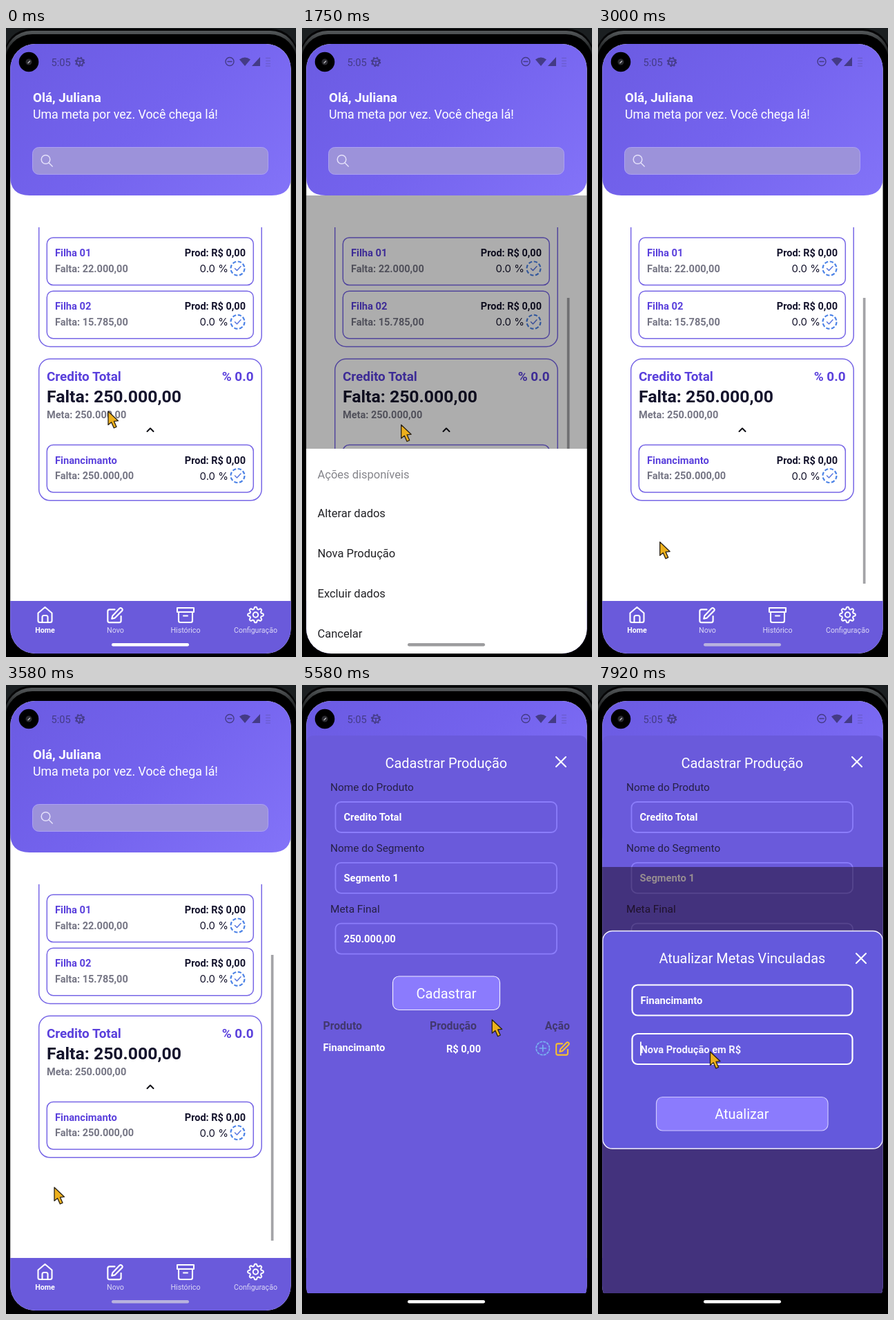
These frames come from a looping animation (420x909 px, 8000 ms). An HTML page:

```html
<!DOCTYPE html>
<html lang="pt">
<head>
<meta charset="utf-8">
<style>
html, body { margin: 0; width: 100%; height: 100%; overflow: hidden; background: #000; }
svg { display: block; width: 100vw; height: 100vh; font-family: Roboto, sans-serif; }
.b { font-weight: 700; }
.line { fill: none; stroke-linecap: round; stroke-linejoin: round; }
</style>
</head>
<body>
<svg id="stage" viewBox="0 0 420 909"></svg>
<script>
const LOOP = 8000;
const PURPLE = '#6a5adb', BORDER = '#7766e6', TITLE = '#5a40dc', INK = '#14132c', GRAY = '#757584';

const text = (x, y, size, fill, str, opts = '') =>
  `<text x="${x}" y="${y}" font-size="${size}" fill="${fill}" ${opts}>${str}</text>`;
const bold = (x, y, size, fill, str, opts = '') => text(x, y, size, fill, str, `class="b" ${opts}`);
const END = 'text-anchor="end"', MID = 'text-anchor="middle"';
const box = (x, y, w, h, r, fill, stroke = 'none', sw = 1.5) =>
  `<rect x="${x}" y="${y}" width="${w}" height="${h}" rx="${r}" fill="${fill}" stroke="${stroke}" stroke-width="${sw}"/>`;
const line = (d, stroke, sw, extra = '') =>
  `<path class="line" d="${d}" stroke="${stroke}" stroke-width="${sw}" ${extra}/>`;
const ring = (x, y, r, stroke, sw, extra = '') =>
  `<circle cx="${x}" cy="${y}" r="${r}" fill="none" stroke="${stroke}" stroke-width="${sw}" ${extra}/>`;

function gear(cx, cy, r, amp) {
  let d = '';
  for (let i = 0; i < 96; i++) {
    const a = i / 96 * Math.PI * 2;
    const q = r + amp * Math.tanh(2 * Math.cos(8 * a));
    d += (i ? 'L' : 'M') + (cx + q * Math.cos(a)).toFixed(2) + ' ' + (cy + q * Math.sin(a)).toFixed(2);
  }
  return d + 'Z';
}

const edit = (x, y, s, color, sw) => `<g transform="translate(${x} ${y}) scale(${s})">` +
  line('M0-8H-7Q-9.5-8-9.5-5.5V7Q-9.5 9.5-7 9.5H6Q8.5 9.5 8.5 7V1M6.5-9.5Q8-11 9.7-9.4Q11.3-7.7 9.7-6.2L0 3.4L-4 4.4L-3 .4Z', color, sw) + '</g>';
const close = (x, y) => line(`M${x - 7} ${y - 7}l14 14m0-14l-14 14`, '#fff', 2.1);

function goal(y, name, left) {
  return box(59.3, y, 299, 68.5, 9, '#fff', BORDER) +
    bold(71, y + 27, 14.7, TITLE, name) +
    bold(71, y + 49.5, 14.5, GRAY, 'Falta: ' + left) +
    bold(347, y + 27, 14.5, INK, 'Prod: R$ 0,00', END) +
    text(322, y + 50, 15, INK, '0.0 %', END + ' font-family="Inter, sans-serif"') +
    ring(335.5, y + 44.5, 10, '#4b82e6', 2.2, 'stroke-dasharray="5.2 2.65"') +
    line(`M331.5 ${y + 44.5}l3 3l5.5-6`, '#5b78e0', 1.5);
}

function field(y, label, value) {
  return text(41, y - 16, 15.4, '#262046', label) +
    box(48.5, y, 320.5, 44, 8, 'none', '#8b7dfb', 1.8) +
    bold(60.5, y + 27, 14.7, '#fff', value);
}

const statusBar = () => {
  const c = '#443b86';
  return `<circle cx="33" cy="49" r="14.3" fill="#000"/><circle cx="33" cy="49" r="4.5" fill="#2b2b30"/>` +
    line('M32 50.5l2.5-2.5', '#b9b9bd', 1.4) +
    text(65.5, 55, 14.6, c, '5:05') +
    ring(107, 49, 5, c, 1.7) + ring(107, 49, 6.5, c, 1.5, 'stroke-dasharray="2.5 2.6"') +
    line('M102 48h10M107 48v6', c, 1.6) +
    ring(324, 48.5, 6, c, 1.4) + line('M321 48.5h6', c, 1.4) +
    `<path d="M338 45.5Q346 39.5 354 45.5L346 55Z" fill="${c}"/><path d="M368 42V55H356Z" fill="${c}"/>` +
    line('M376.5 43.5h6M376.5 47.5h6M376.5 51.5h6M376.5 55h6', '#6357b8', 1.3, 'opacity=".55"');
};

const header = () =>
  `<path d="M6 23H413V214Q413 242 385 242H34Q6 242 6 214Z" fill="url(#sky)"/>` +
  bold(39, 106.5, 18.8, '#fff', 'Olá, Juliana') +
  text(39, 130.5, 17.8, '#fff', 'Uma meta por vez. Você chega lá!') +
  box(38.5, 172.5, 341, 39, 9, '#9c92da', '#aca1f2', 1) +
  ring(57.5, 190, 6.3, '#e4e0fa', 1.5) + line('M62.2 195l5 5', '#e4e0fa', 1.5);

const tabs = () => {
  const w = '#fff', off = '#dcd8f6';
  return `<rect x="6" y="828" width="407" height="80" fill="${PURPLE}"/>` +
    line('M46.5 845.5L56.5 837L66.5 845.5V856.5Q66.5 859 64 859H49Q46.5 859 46.5 856.5ZM52.5 859V851.5Q52.5 849 55 849H58Q60.5 849 60.5 851.5V859', w, 2.1) +
    edit(157.5, 849, 1.07, w, 2) +
    line('M248 838h24v6h-24ZM250 844V856.5Q250 859 252.5 859H267.5Q270 859 270 856.5V844M257 849.5h6', w, 2.1) +
    line(gear(361.5, 848, 9.9, 1.5), w, 2) + ring(361.5, 848, 3.7, w, 2) +
    bold(56.5, 874, 10.7, w, 'Home', MID) +
    text(158.5, 874, 10.7, off, 'Novo', MID) +
    text(260, 874, 10.7, off, 'Histórico', MID) +
    text(361.5, 874, 10.6, off, 'Configuração', MID);
};

const home = () => `<rect x="6" y="23" width="407" height="886" fill="#fff"/>
  <g clip-path="url(#list)">${box(47.7, 220, 322.5, 240.5, 16, '#fff', BORDER)}
    ${goal(303, 'Filha 01', '22.000,00')}${goal(380.2, 'Filha 02', '15.785,00')}</g>
  <g id="card">${box(47.7, 478.3, 322.5, 204.5, 16, '#fff', BORDER)}
    ${bold(59, 509.5, 18.9, TITLE, 'Credito Total')}${bold(358.5, 509.5, 18.9, TITLE, '% 0.0', END)}
    ${bold(59, 541, 24.8, INK, 'Falta: 250.000,00')}${bold(59, 563.5, 14.5, GRAY, 'Meta: 250.000,00')}
    ${goal(602.5, 'Financimanto', '250.000,00')}</g>
  ${line('M204.5 583l4.5-4.5l4.5 4.5', '#0c0c14', 2, 'id="chevron"')}
  <rect id="bar" x="383.8" y="390" width="3.7" height="413" fill="#a3a3a7"/>
  ${tabs()}<rect id="dim" x="6" y="242" width="407" height="667"/>${header()}`;

const sheet = () => `<g id="sheet"><rect x="6" y="608" width="407" height="301" fill="#fff"/>
  ${text(22.5, 650.5, 16.5, '#85858b', 'Ações disponíveis')}
  ${['Alterar dados', 'Nova Produção', 'Excluir dados', 'Cancelar']
    .map((s, i) => text(22.5, 707 + 58 * i, 16.5, '#222226', s)).join('')}</g>`;

const form = () => `<g id="form"><path d="M6 909V85Q6 73 18 73H401Q413 73 413 85V909Z" fill="${PURPLE}"/>
  ${text(208.8, 119.5, 19.9, '#fff', 'Cadastrar Produção', MID)}${close(375, 111)}
  ${field(169, 'Nome do Produto', 'Credito Total')}
  ${field(256.8, 'Nome do Segmento', 'Segmento 1')}
  ${field(344.6, 'Meta Final', '250.000,00')}
  ${box(131.5, 421, 155, 48.5, 9, '#8b7bfd', '#f0eeff', 1.2)}
  ${text(209, 452.5, 20, '#fff', 'Cadastrar', MID)}
  ${bold(30.5, 497.5, 15.8, '#42386f', 'Produto')}${bold(185, 497.5, 15.8, '#42386f', 'Produção')}
  ${bold(388, 497.5, 15.8, '#42386f', 'Ação', END)}
  ${bold(30.5, 528.5, 14.7, '#fff', 'Financimanto')}${bold(209, 530.5, 14.6, '#fff', 'R$ 0,00')}
  <g id="plus">${ring(348.8, 525, 9.6, '#78aef0', 1.8, 'stroke-dasharray="4 1.03"')}${line('M344.3 525h9M348.8 520.5v9', '#78aef0', 1.7)}</g>
  ${edit(377, 525.8, .93, '#f7c030', 2.2)}</g>`;

const dialog = () => `<g clip-path="url(#page)"><g id="dialog">
  <rect x="6" y="263" width="407" height="617" fill="#14000a" opacity=".45"/>
  ${box(6.8, 355.5, 405.5, 314.5, 14, '#6459dc', '#f4f2ff', 1.4)}
  ${text(208.8, 401.5, 19.85, '#fff', 'Atualizar Metas Vinculadas', MID)}${close(381, 395)}
  ${box(49.5, 433.5, 319, 44, 8, 'none', '#fff', 2.2)}${bold(61.5, 460.5, 14.7, '#fff', 'Financimanto')}
  ${box(49.5, 504, 319, 44, 8, 'none', '#fff', 2.2)}${bold(61.5, 531.5, 14.6, '#f4f2ff', 'Nova Produção em R$')}
  <rect id="caret" x="61" y="515.5" width="1.8" height="20" fill="#fff"/>
  ${box(84.5, 595.5, 248.5, 48.5, 9, '#8b7bfd', '#cfc8ff', 1.2)}
  ${text(208.3, 627, 19.9, '#fff', 'Atualizar', MID)}</g></g>`;

const stage = document.getElementById('stage');
stage.innerHTML = `<defs>
  <linearGradient id="sky" gradientUnits="userSpaceOnUse" x1="6" y1="23" x2="319" y2="336">
    <stop offset="0" stop-color="#6b5be2"/><stop offset=".5" stop-color="#7463ee"/><stop offset="1" stop-color="#8373f8"/>
  </linearGradient>
  <linearGradient id="rim" x1="0" y1="0" x2="0" y2="1">
    <stop offset="0" stop-color="#54585a"/><stop offset=".03" stop-color="#1c1e1f"/><stop offset="1" stop-color="#0a0a0b"/>
  </linearGradient>
  <clipPath id="screen"><rect x="6.2" y="23" width="406.4" height="881" rx="36"/></clipPath>
  <clipPath id="list"><rect x="6" y="288" width="407" height="540"/></clipPath>
  <clipPath id="page"><rect x="6" y="23" width="407" height="856"/></clipPath>
</defs>
<rect width="420" height="909" fill="#1b1f21"/>
<rect x="-3" y="1" width="426" height="960" rx="39" fill="#060607"/>
<rect x="-2" y="4" width="424" height="960" rx="39" fill="url(#rim)"/>
<rect x="-1" y="9" width="422" height="960" rx="39" fill="#000"/>
<g clip-path="url(#screen)">${home()}${sheet()}${form()}${dialog()}${statusBar()}</g>
<rect id="nav" y="879" width="420" height="30"/>
<rect id="pill" x="153" y="889" width="112" height="4.4" rx="2.2"/>
<path id="cursor" d="M0 0V19.5L4.6 15.7L8.3 24L12 22.3L8.4 14.3L14.5 13.7Z" fill="#edb01c" stroke="#2a2216" stroke-width="1.3" stroke-linejoin="round"/>`;

const el = {};
stage.querySelectorAll('[id]').forEach(n => el[n.id] = n);

const clamp = v => Math.max(0, Math.min(1, v));
const ramp = (t, start, dur) => clamp((t - start) / dur);
const easeOut = p => 1 - (1 - p) ** 3;
const smooth = p => p * p * (3 - 2 * p);
const show = (node, on) => node.setAttribute('visibility', on ? 'visible' : 'hidden');
const slide = (node, p, dist) => {
  node.setAttribute('transform', `translate(0 ${((1 - p) * dist).toFixed(2)})`);
  show(node, p > 0);
};

// Pointer stops: time, x, y
const STOPS = [
  [0, 148, 554], [250, 148, 554], [800, 150.5, 533], [1550, 150.5, 533],
  [2300, 112, 762], [2620, 112, 762], [3350, 70, 726], [3650, 70, 726],
  [4450, 205.5, 448], [5000, 205.5, 448], [6200, 352, 523], [6850, 352, 523],
  [7650, 162.5, 530], [LOOP, 162.5, 530]
];

function pointer(t) {
  let i = 1;
  while (i < STOPS.length - 1 && STOPS[i][0] < t) i++;
  const [t0, x0, y0] = STOPS[i - 1], [t1, x1, y1] = STOPS[i];
  const p = smooth(ramp(t, t0, t1 - t0));
  return [x0 + (x1 - x0) * p, y0 + (y1 - y0) * p];
}

function draw(t) {
  const press = ramp(t, 880, 150) - ramp(t, 1500, 200);
  el.card.setAttribute('opacity', 1 - .8 * press);
  el.chevron.setAttribute('opacity', 1 - .6 * press);
  show(el.bar, t >= 850);

  const open = easeOut(ramp(t, 1420, 280)) - easeOut(ramp(t, 2640, 260));
  slide(el.sheet, open, 301);
  el.dim.setAttribute('opacity', .32 * open);

  const formIn = easeOut(ramp(t, 3640, 330));
  slide(el.form, formIn, 836);
  show(el.nav, formIn > 0);
  el.plus.setAttribute('opacity', 1 - .8 * (ramp(t, 6480, 130) - ramp(t, 6780, 150)));

  slide(el.dialog, easeOut(ramp(t, 6850, 320)), 617);
  show(el.caret, t >= 7700);

  el.pill.setAttribute('fill', formIn > 0 || t < 1420 ? '#fff' : open > .1 ? '#9c9c9e' : '#b9b2de');
  el.cursor.setAttribute('transform', `translate(${pointer(t)})`);
}

const begin = performance.now();
function tick() {
  draw((performance.now() - begin) % LOOP);
  requestAnimationFrame(tick);
}
draw(0);
requestAnimationFrame(tick);
</script>
</body>
</html>
```
